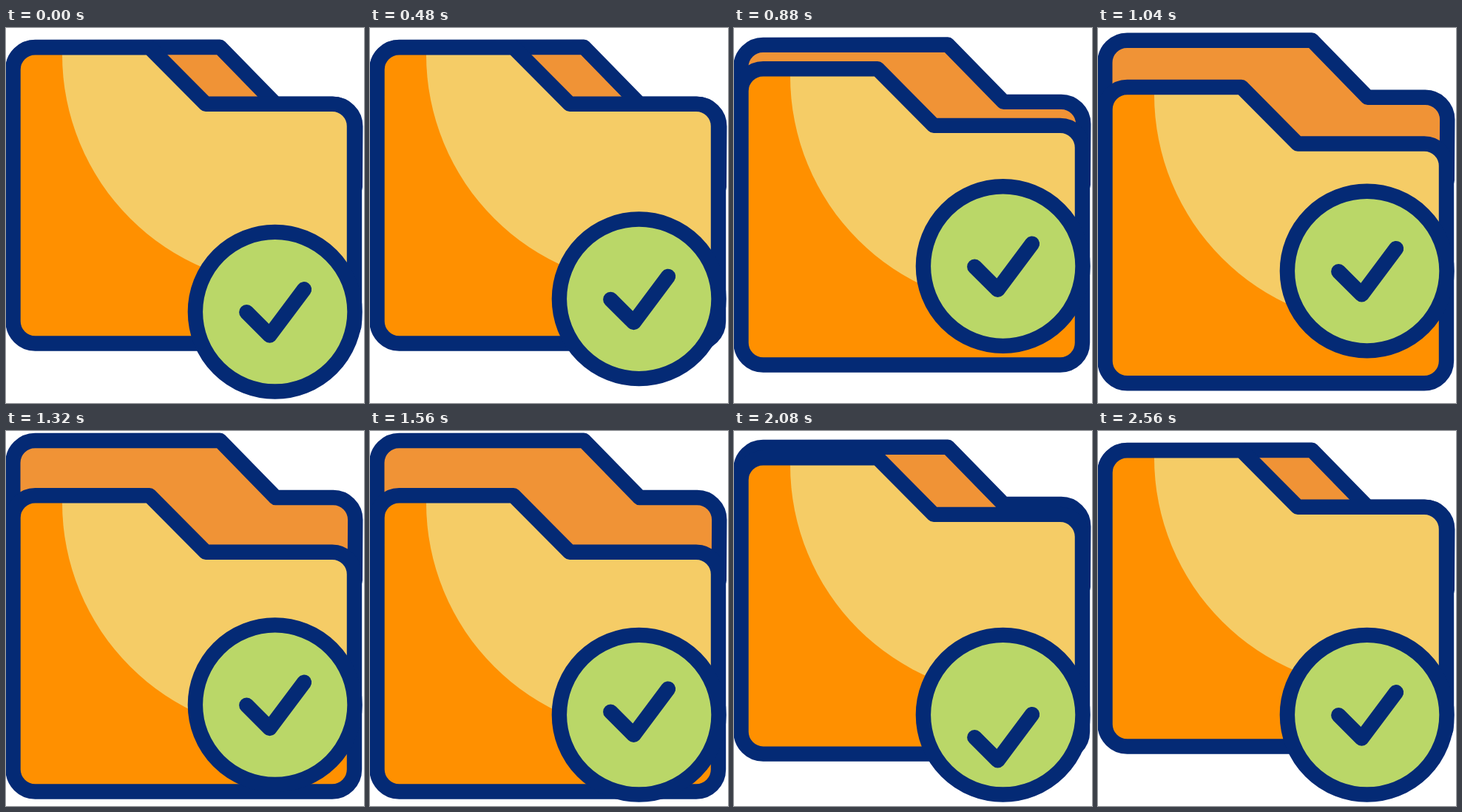
Animation, 484 px wide and 507 px high, one loop 3000 ms. Source, as an HTML page:

```html
<!DOCTYPE html>
<html lang="en">
<head>
<meta charset="utf-8">
<title>Folder check</title>
<style>
  html, body { margin: 0; width: 100%; height: 100%; overflow: hidden; background: #fff; }
  svg { display: block; width: 100%; height: 100%; }
</style>
</head>
<body>
<svg viewBox="0 0 484 507" stroke="#042a75" stroke-width="20.4" stroke-linejoin="round" stroke-linecap="round">
  <defs>
    <path id="shape" d="M39.5 26.2H194L270 102.8H441a30 30 0 0 1 30 30V396.5a30 30 0 0 1-30 30H39.5a30 30 0 0 1-30-30V56.2a30 30 0 0 1 30-30Z"/>
    <clipPath id="clip"><use href="#shape"/></clipPath>
  </defs>
  <path id="back" fill="#f09336" d="M9.3 255V56a30 30 0 0 1 30-30L289 25.7L364.5 103H442a30 30 0 0 1 30.3 30L471.8 215"/>
  <g id="front">
    <use href="#shape" fill="#ff9000" stroke="none"/>
    <circle cx="389" cy="36" r="313" fill="#f5cc66" stroke="none" clip-path="url(#clip)"/>
    <use href="#shape" fill="none"/>
  </g>
  <g id="badge">
    <circle cx="363.7" cy="383.7" r="107.8" fill="#bad768"/>
    <path id="tick" fill="none" d="M325.3 384.3L356.5 415.5L403 353.3"/>
  </g>
</svg>
<script>
  const LOOP = 3000, STEP = 40;

  // Smooth progress from 0 to 1 between two times.
  function ease(t, from, to) {
    const u = Math.min(1, Math.max(0, (t - from) / (to - from)));
    return u * u * (3 - 2 * u);
  }

  // Goes out to 1 during one span and returns to 0 during another.
  const outAndBack = (t, out, outEnd, back, backEnd) => ease(t, out, outEnd) - ease(t, back, backEnd);

  // Swings up, down and back to rest in three equal beats.
  function nod(t, from, beat) {
    const at = n => ease(t, from + n * beat, from + (n + 1) * beat);
    return 2 * at(1) - at(0) - at(2);
  }

  function shift(id, y) {
    document.getElementById(id).setAttribute('transform', `translate(0 ${y.toFixed(2)})`);
  }

  const start = performance.now();
  function draw(now) {
    const t = Math.floor(Math.max(0, now - start) % LOOP / STEP) * STEP;
    shift('back', -13 * outAndBack(t, 720, 1217, 1715, 2295));
    shift('front', 61 * outAndBack(t, 623, 1154, 1666, 2224));
    shift('badge', -62 * outAndBack(t, 250, 910, 922, 1492));
    shift('tick', 40.8 * nod(t, 1490, 1000 / 3));
    requestAnimationFrame(draw);
  }
  draw(start);
</script>
</body>
</html>
```
